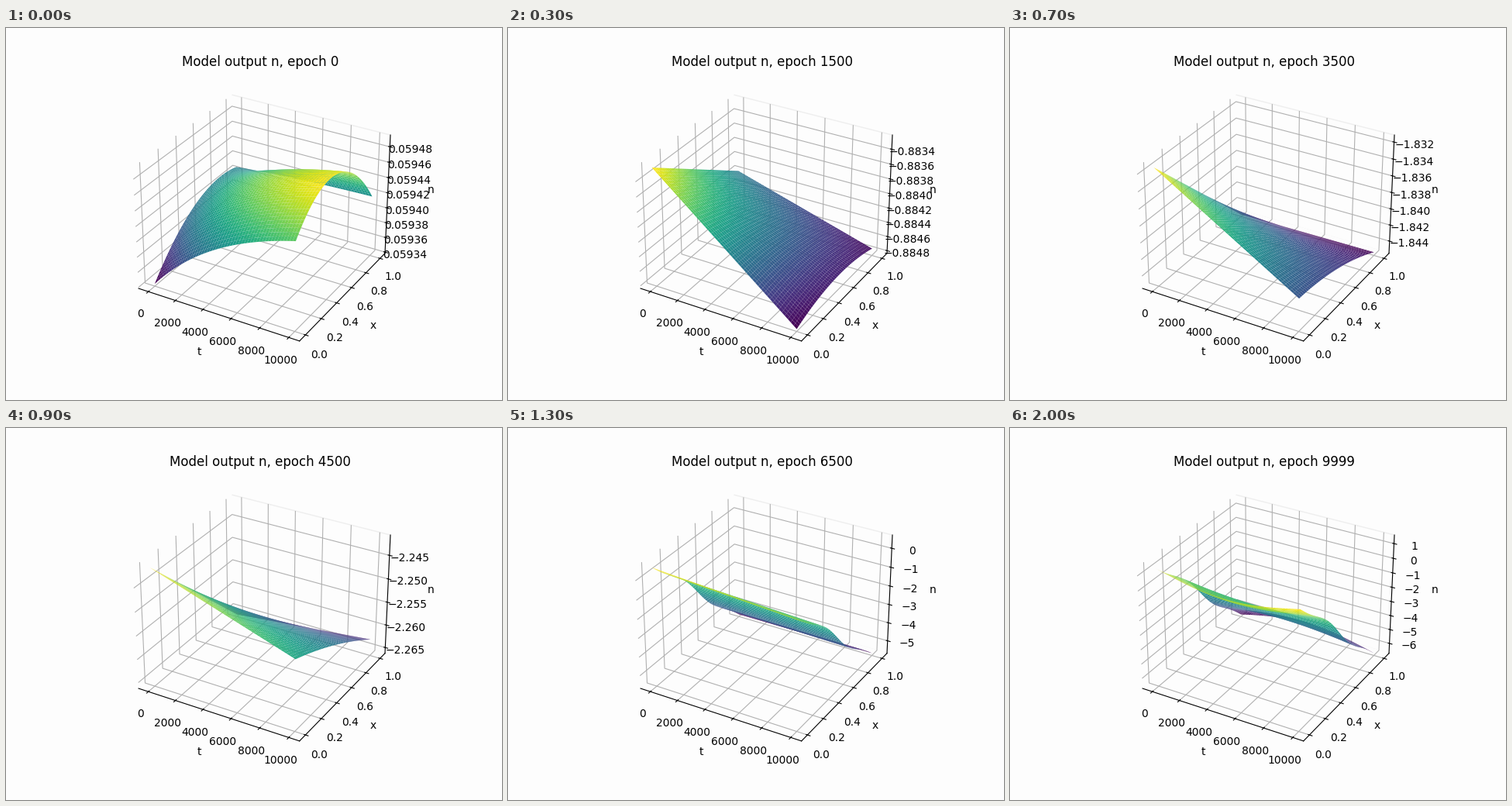
A matplotlib script that plays this animation: 640 by 480 pixels, repeating every 2100 ms.

```python
import numpy as np
import matplotlib.pyplot as plt
from matplotlib.animation import FuncAnimation
from matplotlib.ticker import MaxNLocator

FRAMES = 21
PAPER = "#fdfdfd"
PAD = 0.05 + 1.1 / 48
T_END = 10000

# Visible z range at a few steps: step, low, high
Z_KEYS = np.array([
    (0, .0593384, .0594950),
    (3, -.884837, -.883211),
    (5, -1.424769, -1.421590),
    (9, -2.26629, -2.24076),
    (13, -5.70, .69),
    (20, -6.72, 1.58),
])

s = np.linspace(0, 1, 50)
U, V = np.meshgrid(s, s)  # along t, along x


def ramp(i, start, stop):
    return np.clip((i - start) / (stop - start), 0, 1)


def smooth(p):
    return p * p * (3 - 2 * p)


def hump():
    """Untrained output: one parabola in x turning into another."""
    grow = (1 - np.exp(-1.5 * U)) / (1 - np.exp(-1.5))
    first = .47 - .7 * (V - .8) ** 2
    last = .98 - 1.4 * (V - .42) ** 2
    return (1 - grow) * first + grow * last


def sheet(i):
    """Trained output: a tilted sheet that learns a step in x."""
    near = .02 + .88 * smooth(ramp(i, 3, 13)) + .08 * ramp(i, 13, 17)
    back = .02 + .386 * (1 - ramp(i, 3, 8))
    far = .02 + .04 * (1 - ramp(i, 3, 5)) + .12 * np.sin(np.pi * ramp(i, 5, 13))
    z = (1 - V) * ((1 - U) * .98 + U * near) + V * ((1 - U) * back + U * far)
    z += .32 * (1 - ramp(i, 3, 13)) * U * V * (1 - V)
    z += .06 * ramp(i, 9, 13) * np.sin(2 * np.pi * V) * np.sin(np.pi * V) ** 2
    z -= .09 * ramp(i, 13, 17) * np.sin(np.pi * U) * np.cos(np.pi * V)
    return z


def heights(i):
    """Surface as fractions of the visible z range."""
    p = ramp(i, 0, 3)
    z = (1 - p) * hump() + p * sheet(i)
    return .02 + .96 * (z - z.min()) / np.ptp(z)


def z_range(i):
    if i > 13:
        i = 13 + 7 * (1 - (1 - ramp(i, 13, 20)) ** 1.7)
    steps, low, high = Z_KEYS.T
    return np.interp(i, steps, low), np.interp(i, steps, high)


fig = plt.figure(figsize=(6.4, 4.8), dpi=100, facecolor=PAPER)
ax = fig.add_subplot(projection="3d", facecolor=PAPER)
ax.set(xlabel="t", ylabel="x", zlabel="n")
ax.zaxis.set_major_locator(MaxNLocator(9, steps=[1, 2, 2.5, 5, 10]))
for axis, edge in ((ax.xaxis, PAPER), (ax.yaxis, "#eeeeee"), (ax.zaxis, PAPER)):
    axis.pane.set(facecolor=PAPER, edgecolor=edge, alpha=1)


def draw(i):
    for surface in list(ax.collections):
        surface.remove()
    low, high = z_range(i)
    ax.plot_surface(U * T_END, V, low + heights(i) * (high - low), cmap="viridis")
    ax.set_xlim(-PAD * T_END, (1 + PAD) * T_END)
    ax.set_ylim(-PAD, 1 + PAD)
    ax.set_zlim(low, high)
    ax.set_title(f"Model output n, epoch {min(500 * i, 9999)}")


anim = FuncAnimation(fig, draw, frames=FRAMES, interval=100, repeat=True)
plt.show()
```
